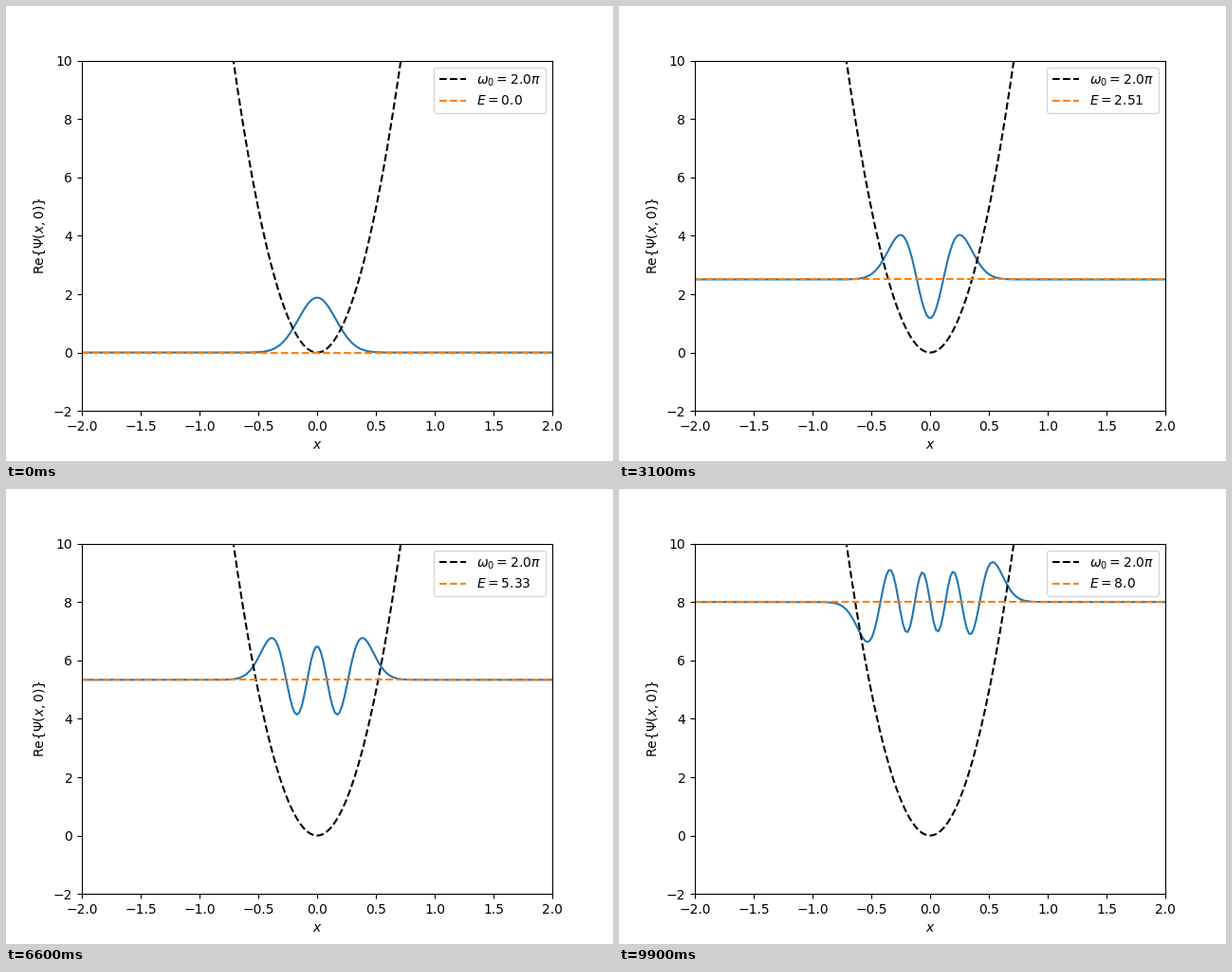
Animation of 640 by 480 pixels, one loop 10 s. Source, as a matplotlib script:

```python
from math import factorial, pi

import matplotlib.pyplot as plt
import numpy as np
from matplotlib.animation import FuncAnimation
from numpy.polynomial.hermite import hermval

FRAMES = 100
OMEGA = 2 * pi
HBAR = 1 / (2 * pi)
E_MAX = 8.0

x = np.linspace(-2, 2, 200)
energies = np.linspace(0, E_MAX, FRAMES)


def eigenstate(n):
    """Normalised harmonic-oscillator state of unit mass."""
    a = OMEGA / HBAR
    xi = np.sqrt(a) * x
    norm = (a / pi) ** 0.25 / np.sqrt(2.0**n * factorial(n))
    return norm * hermval(xi, [0] * n + [1]) * np.exp(-xi**2 / 2)


def level(energy):
    """Highest level n with (n + 1/2) * hbar * omega <= energy."""
    return max(0, int(np.floor(energy / (HBAR * OMEGA) - 0.5)))


fig, ax = plt.subplots(figsize=(6.4, 4.8), dpi=100)
wave, = ax.plot(x, eigenstate(0), color="C0")
ax.plot(x, 0.5 * OMEGA**2 * x**2, "k--",
        label=rf"$\omega_0={OMEGA / pi}\pi$")
line, = ax.plot(x, np.zeros_like(x), "--", color="C1", label="$E=0.0$")
ax.set_xlim(-2, 2)
ax.set_ylim(-2, 10)
ax.set_xlabel("$x$")
ax.set_ylabel(r"Re{$\Psi(x,0)$}")
legend = ax.legend(loc="upper right")
energy_text = legend.get_texts()[1]


def update(i):
    e = energies[i]
    wave.set_ydata(eigenstate(level(e)) + e)
    line.set_ydata(np.full_like(x, e))
    energy_text.set_text(f"$E={round(float(e), 2)}$")
    return wave, line, energy_text


anim = FuncAnimation(fig, update, frames=FRAMES, interval=100,
                     repeat=True, repeat_delay=0)
plt.show()
```
